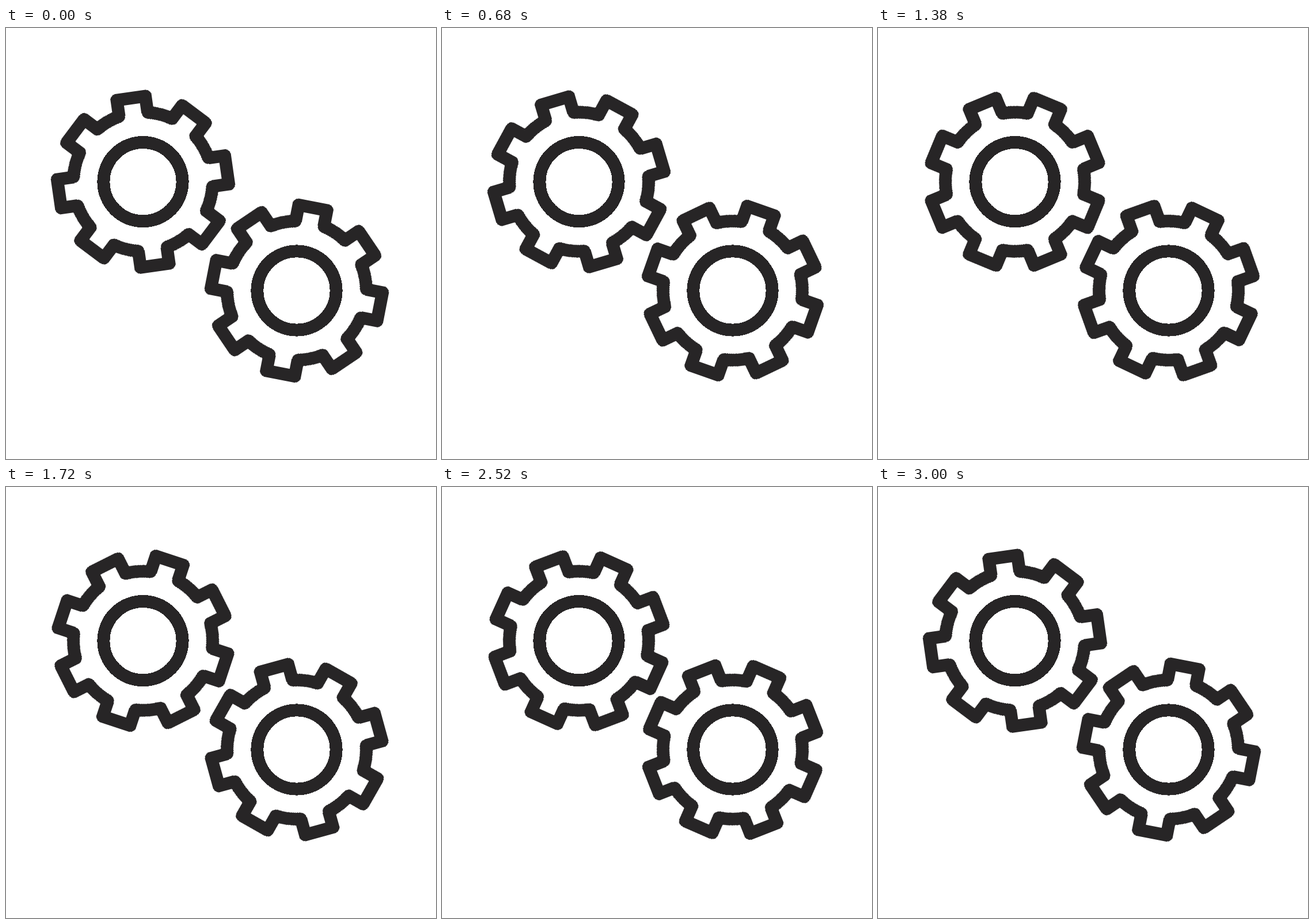
Write an HTML page that moves like this. It is 747 px wide and 750 px high and loops after 3.02 s.

```html
<!DOCTYPE html>
<html lang="en">
<head>
<meta charset="utf-8">
<title>Turning gears</title>
<style>
  html, body { margin: 0; width: 100%; height: 100%; overflow: hidden; background: #fff; }
  svg { display: block; width: 747px; height: 750px; }
  .gear {
    fill: none;
    stroke: #272526;
    stroke-width: 22;
    stroke-linejoin: round;
    shape-rendering: crispEdges;
  }
  /* 151 poses, 2.4 degrees apart, 20 ms each; the tiny delay keeps ticks on their boundary */
  .teeth { animation: turn 3020ms steps(151) -1ms infinite; }
  .left  { --start: -8.1deg; --sweep: 362.4deg; }
  .right { --start: 11deg; --sweep: -362.4deg; }
  @keyframes turn {
    from { transform: rotate(var(--start)); }
    to   { transform: rotate(calc(var(--start) + var(--sweep))); }
  }
</style>
</head>
<body>
<svg viewBox="0 0 747 750">
  <g class="gear left" transform="translate(238 267.6)">
    <circle r="68.6"/>
    <path class="teeth"/>
  </g>
  <g class="gear right" transform="translate(505 456.9)">
    <circle r="68.6"/>
    <path class="teeth"/>
  </g>
</svg>
<script>
  const TEETH = 8, BODY = 121, TIP = 146.8, HALF = 25.4;
  const ROOT = Math.sqrt(BODY * BODY - HALF * HALF);

  // Point at a sideways offset and a distance along the axis of tooth i
  function point(i, side, along) {
    const a = i * 2 * Math.PI / TEETH;
    const x = side * Math.cos(a) + along * Math.sin(a);
    const y = side * Math.sin(a) - along * Math.cos(a);
    return x.toFixed(2) + ' ' + y.toFixed(2);
  }

  function gearPath() {
    let d = 'M' + point(0, -HALF, ROOT);
    for (let i = 0; i < TEETH; i++) {
      d += 'L' + point(i, -HALF, TIP) + 'L' + point(i, HALF, TIP) + 'L' + point(i, HALF, ROOT);
      d += `A${BODY} ${BODY} 0 0 1 ` + point(i + 1, -HALF, ROOT);
    }
    return d + 'Z';
  }

  const outline = gearPath();
  document.querySelectorAll('.teeth').forEach(p => p.setAttribute('d', outline));
</script>
</body>
</html>
```
